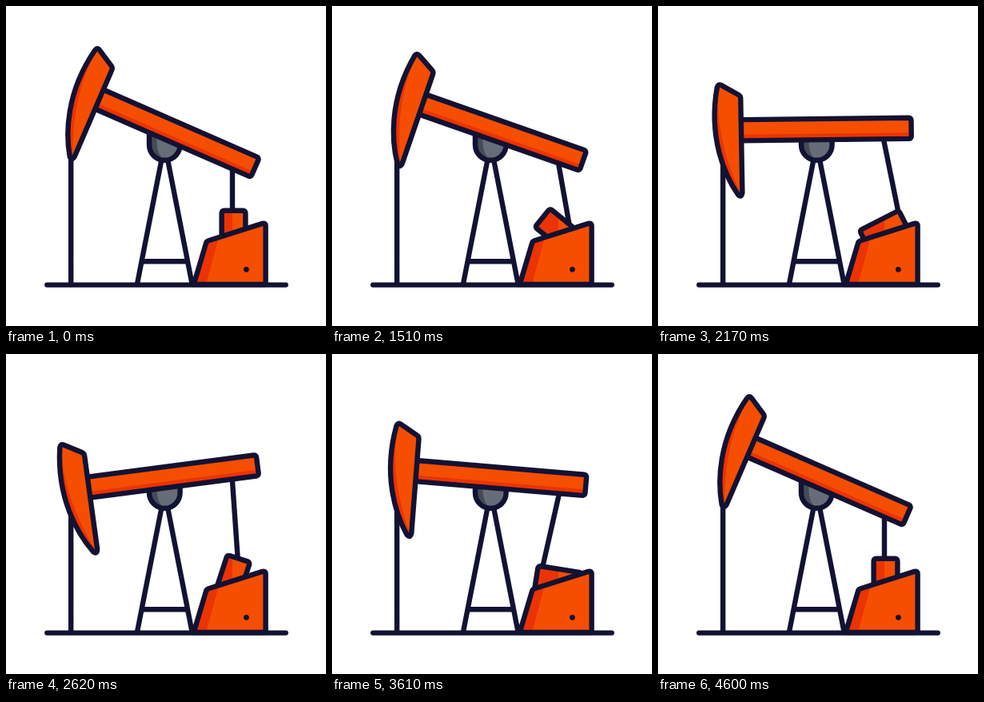
Animation, 400 px wide and 400 px high, one loop 4630 ms. Source, as an HTML page without scripts:

```html
<!DOCTYPE html>
<html lang="en">
<head>
<meta charset="utf-8">
<title>Pump jack</title>
<style>
  @property --crank { syntax: "<angle>"; inherits: true; initial-value: 0deg; }

  html, body { margin: 0; width: 100%; height: 100%; overflow: hidden; background: #fff; }

  svg {
    display: block;
    width: 100%;
    height: 100%;
    --ink: #121233;
    --light: #f54e00;
    --dark: #ec3302;
    animation: turn 4630ms infinite;
  }

  /* Rest, then one full turn of the crank in 3 degree ticks */
  @keyframes turn {
    0% { --crank: 0deg; }
    21.59% { --crank: 0deg; animation-timing-function: steps(120); }
    99.35%, 100% { --crank: 360deg; }
  }

  .line { fill: none; stroke: var(--ink); stroke-width: 6.4; stroke-linecap: round; stroke-linejoin: round; }
  .light { fill: var(--light); }
  .dark { fill: var(--dark); }

  .beam {
    transform-origin: 200px 165px;
    transform: rotate(calc(-15.75deg + 16.74deg * cos(var(--crank)) - .99deg * cos(3 * var(--crank))));
  }
  .weight, .shade { transform-origin: 283.3px 282.7px; }
  .weight { transform: rotate(calc(-1 * var(--crank))); }
  .shade { transform: rotate(var(--crank)); }

  /* Lower end follows the crank pin, upper end slides vertically */
  .rod {
    transform-origin: 283px 283px;
    transform:
      translate(calc(23px * sin(var(--crank))), calc(23px * cos(var(--crank))))
      rotate(calc(-12.9deg * sin(var(--crank))));
  }
</style>
</head>
<body>
<svg viewBox="0 0 400 400">
  <defs>
    <rect id="block" x="269.6" y="255.7" width="29.8" height="55" rx="3"/>
    <rect id="bar" x="-97" y="-24.5" width="213.5" height="26.2" rx="3"/>
    <path id="head" d="M79 188C74 160 74 108 110.5 55Q113.5 51 116.5 55L131 74.5Q132.8 77 131.6 79.7L85 188Q81 194 79 188Z"/>
    <path id="hub" d="M179 158V173.5A19.3 19.3 0 0 0 217.6 173.5V158Z"/>
    <path id="base" d="M234.7 348L250 296.6Q250.7 294.2 253.2 293.3L320.5 271.9Q324.6 270.9 324.6 275V348Z"/>
    <clipPath id="in-block"><use href="#block"/></clipPath>
    <clipPath id="in-bar"><use href="#bar"/></clipPath>
    <clipPath id="in-head"><use href="#head"/></clipPath>
    <clipPath id="in-hub"><use href="#hub"/></clipPath>
    <clipPath id="in-base"><use href="#base"/></clipPath>
  </defs>

  <path class="line" d="M81.2 188V348M194.3 193L163.9 348M202.3 193L232.7 348M170 319.2H227"/>

  <use href="#hub" fill="#676d78"/>
  <path clip-path="url(#in-hub)" fill="#454a57" d="M176 155H188.5V172Q189 186 199 194H176Z"/>
  <use href="#hub" class="line"/>

  <path class="line rod" d="M283 168V283"/>

  <g class="weight">
    <use href="#block" class="light"/>
    <g clip-path="url(#in-block)">
      <rect class="dark shade" x="240" y="240" width="43" height="90"/>
    </g>
    <use href="#block" class="line"/>
  </g>

  <use href="#base" class="light"/>
  <path clip-path="url(#in-base)" class="dark" d="M230 350L248 285H267L249.5 350Z"/>
  <use href="#base" class="line"/>
  <circle cx="300.4" cy="329.3" r="3.4" fill="var(--ink)"/>

  <g class="beam">
    <g transform="translate(200 165.6) rotate(23.65)">
      <use href="#bar" class="light"/>
      <rect clip-path="url(#in-bar)" class="dark" x="-97" y="-6" width="214" height="8"/>
      <use href="#bar" class="line"/>
    </g>
    <g transform="translate(.7 .3)">
      <use href="#head" class="dark"/>
      <path clip-path="url(#in-head)" class="light" d="M114 52C87 100 82 150 82.5 192L140 192V52Z"/>
      <use href="#head" class="line"/>
    </g>
  </g>

  <path class="line" d="M51.3 348.6H349.7"/>
</svg>
</body>
</html>
```
